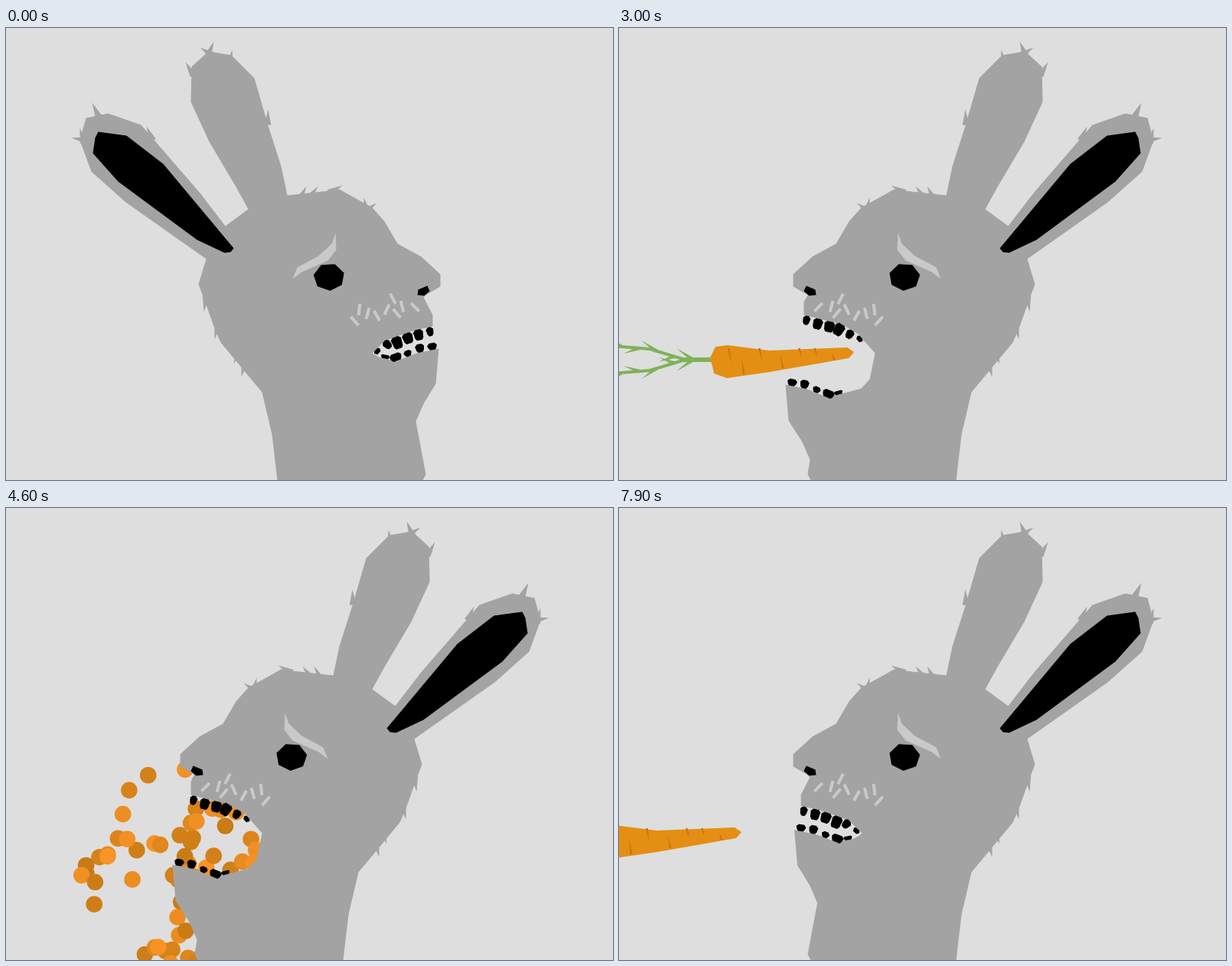
Recreate the animation shown at these times as an HTML page with a canvas. Size 793x590 px, loop 8 s.

```html
<!DOCTYPE html>
<html lang="en">
<head>
<meta charset="utf-8">
<title>Hungry rabbit</title>
<style>
  html, body { margin: 0; width: 793px; height: 590px; overflow: hidden; background: #dedede; }
  canvas { display: block; }
</style>
</head>
<body>
<canvas id="stage" width="793" height="590"></canvas>
<script>
const ctx = document.getElementById('stage').getContext('2d');
const LOOP = 8000, STEP = 100, TURN = 2000, BURST = 4100, BURST_END = 5000;
const BG = '#dedede', FUR = '#a3a3a3', PALE = '#c9c9c9', ORANGE = '#e58e14', GREEN = '#7fb25a';
const RAD = Math.PI / 180;

// The head is drawn facing left and mirrored when it looks right.
const BACK = [246,582, 250,590, 440,590, 447,530, 460,475, 480,451, 514,410, 523,389, 534,358, 543,334];
const NEAR_EAR = [533,301, 638,227, 683,187, 698,146, 690,117, 661,111, 618,126, 541,215, 508,258];
const FAR_EAR = [478,236, 494,207, 529,148, 553,96, 552,50, 530,30, 500,35, 470,65, 452,127, 435,180, 427,218];
const BROWLINE = [382,213, 359,210, 316,234, 300,252, 283,281, 252,298, 227,321, 227,337, 246,348];
const INNER_EAR = [674,135, 637,140, 589,177, 497,287, 501,292, 509,293, 545,276, 648,200, 681,163, 678,143];
const BROW = [364,267, 363,289, 374,303, 408,318, 420,327, 414,312, 386,297, 369,281];
const NOSTRIL = [244,336, 256,341, 257,348, 248,349, 241,343];

// Movable edge from under the nose to the throat: closed x, y, open x, y.
const JAW = [
  [249,351, 241,357], [237,374, 241,365],
  [237,389, 241,374], [260,394, 264,380], [284,402, 290,386], [300,408, 312,399],
  [316,424, 334,424], [313,426, 327,458], [305,430, 316,470], [284,434, 272,482],
  [258,424, 246,471], [229,418, 217,465],
  [233,464, 221,512], [249,490, 239,540], [259,513, 249,563]
];

// Tip x, y and direction of each tuft.
const TUFTS = [
  [499,28,-100], [523,17,-112], [541,25,-32], [560,44,-60], [452,106,-92],
  [682,97,-65], [709,143,-9], [698,130,-76], [611,128,-65],
  [355,205,-152], [387,206,-127], [402,206,-118], [310,228,-146], [327,221,-77],
  [536,370,82], [522,406,78], [497,438,70], [487,455,77]
];

// Centre and direction of each whisker.
const WHISKERS = [
  [260,364,135], [277,363,104], [289,353,117], [284,372,130], [297,367,65],
  [310,375,119], [322,372,75], [333,367,84], [339,382,132]
];

// Carrot with its tip at x = 0.
const ROOT = [-188,430, -181,416, -165,414, -111,421, -9,417, 0,423, -7,431, -110,449, -166,457, -183,451];
const NICKS = [-164, -144, -124, -93, -72, -52, -26];

const mix = (a, b, p) => a + (b - a) * p;
const ease = p => (1 - Math.cos(Math.PI * Math.min(1, Math.max(0, p)))) / 2;

function poly(pts, color) {
  ctx.fillStyle = color;
  ctx.beginPath();
  for (let i = 0; i < pts.length; i += 2) ctx.lineTo(pts[i], pts[i + 1]);
  ctx.closePath();
  ctx.fill();
}

function spike(x, y, tipX, tipY, width, color) {
  const k = width / 2 / Math.hypot(tipX - x, tipY - y);
  const nx = (y - tipY) * k, ny = (tipX - x) * k;
  poly([x + nx, y + ny, tipX, tipY, x - nx, y - ny], color);
}

function ngon(n, x, y, rx, ry, turn) {
  return Array.from({ length: n }, (_, i) => turn * RAD + i * 2 * Math.PI / n)
    .flatMap(a => [x + rx * Math.cos(a), y + ry * Math.sin(a)]);
}

// Crumbs fill a disc that grows from the mouth and falls.
function makeCrumbs(count) {
  let seed = 41;
  const rand = () => (seed = (seed * 16807) % 2147483647) / 2147483647;
  return Array.from({ length: count }, () => {
    const r = Math.sqrt(rand()), a = rand() * 2 * Math.PI, p = rand();
    return {
      u: r * Math.cos(a), v: r * Math.sin(a),
      color: `rgb(${mix(198, 250, p)},${mix(122, 148, p)},${mix(20, 38, p)})`
    };
  });
}
const crumbs = makeCrumbs(90);

function drawCrumbs(sec) {
  for (const { u, v, color } of crumbs) {
    const x = 264 + u * (36 + 265 * sec);
    const y = 428 + v * (30 + 210 * sec) + 160 * sec * sec;
    ctx.fillStyle = color;
    ctx.beginPath();
    ctx.arc(x, y, 10.8, 0, 7);
    ctx.fill();
  }
}

function drawLeaves(side) {
  const stemY = x => 433 + side * (x > -224 ? 1 : x > -267 ? 1 + (-224 - x) * 0.3 : 14 + (-267 - x) * 0.08);
  ctx.strokeStyle = GREEN;
  ctx.lineWidth = 4;
  ctx.beginPath();
  for (const x of [-186, -224, -267, -350]) ctx.lineTo(x, stemY(x));
  ctx.stroke();
  for (let i = 0; i < 5; i++) {
    const x = -212 - i * 23, y = stemY(x), out = i % 2 ? -0.5 : 1;
    spike(x, y, x - 20, y + side * out * 14, 5, GREEN);
  }
}

function drawCarrot(tip) {
  ctx.save();
  ctx.translate(tip, 0);
  drawLeaves(-1);
  drawLeaves(1);
  poly(ROOT, ORANGE);
  NICKS.forEach((x, i) => {
    const length = 7 - x / 10;
    if (i % 5 === 1 || i === 3) spike(x, 429 - x * 0.16, x - 3, 429 - x * 0.16 - length, 3, '#c47a12');
    else spike(x, 418, x + 4, 418 + length * 0.9, 3, '#c47a12');
  });
  ctx.restore();
}

// Point and direction at a distance along a line of points.
function along(line, dist) {
  for (let i = 1; ; i++) {
    const [x, y] = line[i - 1], dx = line[i][0] - x, dy = line[i][1] - y;
    const len = Math.hypot(dx, dy);
    if (dist <= len || i === line.length - 1) {
      return { x: x + dx * dist / len, y: y + dy * dist / len, turn: Math.atan2(dy, dx) };
    }
    dist -= len;
  }
}

function drawTeeth(lip, first, gap, sizes, side) {
  sizes.forEach(([w, h], i) => {
    const { x, y, turn } = along(lip, first + gap * i);
    const a = w / 2, b = h / 2, c = Math.min(3, b * 0.7);
    ctx.save();
    ctx.translate(x, y);
    ctx.rotate(turn);
    ctx.translate(0, side * b);
    poly([c - a,-b, a - c,-b, a,c - b, a - 1,b - c, a - c,b, c - a,b, 1 - a,b - c, -a,c - b], '#000');
    ctx.restore();
  });
}

function drawHead(open) {
  const edge = JAW.map(([x, y, ox, oy]) => [mix(x, ox, open), mix(y, oy, open)]);
  poly([...BACK, ...NEAR_EAR, ...FAR_EAR, ...BROWLINE, ...edge.flat()], FUR);
  for (const [x, y, deg] of TUFTS) {
    spike(x - 20 * Math.cos(deg * RAD), y - 20 * Math.sin(deg * RAD), x, y, 9, FUR);
  }
  poly(INNER_EAR, '#000');
  poly(BROW, PALE);
  poly(ngon(7, 372.5, 324.5, 20.5, 18, 94), '#000');
  poly(NOSTRIL, '#000');

  ctx.strokeStyle = PALE;
  ctx.lineWidth = 4;
  ctx.beginPath();
  for (const [x, y, deg] of WHISKERS) {
    const dx = 7.5 * Math.cos(deg * RAD), dy = 7.5 * Math.sin(deg * RAD);
    ctx.moveTo(x - dx, y - dy);
    ctx.lineTo(x + dx, y + dy);
  }
  ctx.stroke();

  drawTeeth(edge.slice(2, 7), 5, 15.4, [[10,12], [13,14], [14,14], [14,16], [11,12], [10,6]], 1);
  drawTeeth(edge.slice(7, 12).reverse(), 8, 16.3, [[13,9], [12,11], [11,8], [16,10], [12,5]], -1);
}

function mouthAt(t) {
  if (t < 3000) return ease((t - 1900) / 300);
  if (t < 7000) return 1 - ease((t - 4900) / 400);
  return ease((t - 7850) / 400);
}

function draw(t) {
  ctx.fillStyle = BG;
  ctx.fillRect(0, 0, 793, 590);
  drawCarrot(t < BURST ? 177 + (t - 1900) * 0.1183 : 6 + (t - 6600) * 0.1185);
  if (t >= BURST && t < BURST_END) drawCrumbs((t - BURST) / 1000);
  ctx.save();
  if (t < TURN) ctx.transform(-1, 0, 0, 1, 795, 0);
  ctx.translate(0.5, 0.5);
  drawHead(mouthAt(t));
  ctx.restore();
}

const start = performance.now();
function tick() {
  const t = (performance.now() - start) % LOOP;
  draw(Math.floor(t / STEP) * STEP);
  requestAnimationFrame(tick);
}
tick();
</script>
</body>
</html>
```
